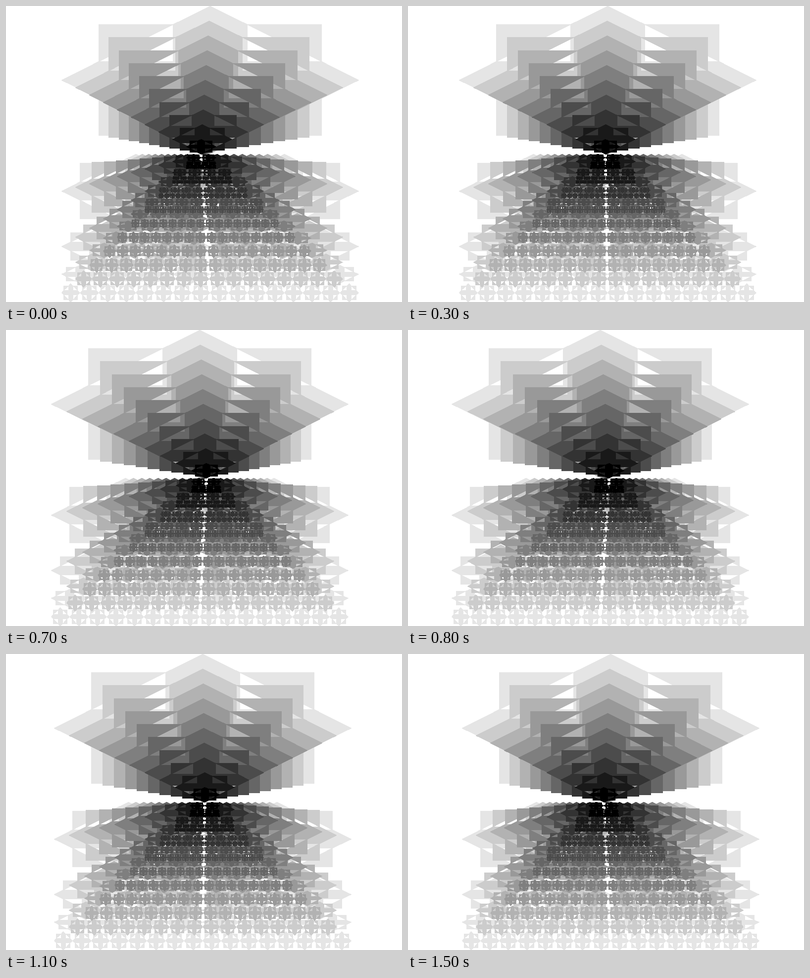
An HTML page for the animation above (1.6 s loop, 800 by 600 pixels).

```html
<!DOCTYPE html>
<html lang="en">
<head>
<meta charset="utf-8">
<title>Star layers</title>
<style>
  html, body { margin: 0; width: 100%; height: 100%; overflow: hidden; background: #fff; }
  svg { display: block; width: 800px; height: 600px; }
</style>
</head>
<body>
<svg viewBox="0 0 800 600" shape-rendering="crispEdges">
  <!-- Half a pixel of offset and a 1px outline make the shapes cover their border pixels. -->
  <g id="stage" transform="translate(.5 .5)" fill-rule="evenodd" stroke-width="1" stroke-linejoin="bevel"></g>
</svg>
<script>
const LAYERS = 10, STEP = 100, STEPS = 16;
const stage = document.getElementById('stage');

// Star on an 8 x 8 grid: the outline, then four triangular holes.
const STAR = [
  [4,0, 5,1, 7,1, 7,3, 8,4, 7,5, 7,7, 5,7, 4,8, 3,7, 1,7, 1,5, 0,4, 1,3, 1,1, 3,1],
  [1,3, 3,1, 3,3],
  [7,3, 5,1, 5,3],
  [1,5, 3,7, 3,5],
  [7,5, 5,7, 5,5]
];

// Corners snap to whole pixels.
function star(x, y, w, h) {
  return STAR.map(pts => {
    let d = '';
    for (let i = 0; i < pts.length; i += 2) {
      const px = Math.floor(x + pts[i] * w / 8);
      const py = Math.floor(y + pts[i + 1] * h / 8);
      d += (i ? 'L' : 'M') + px + ' ' + py;
    }
    return d + 'Z';
  }).join('');
}

// Each row has twice as many stars at half the height; the last row fills the rest.
function layerPath(cx, size) {
  let d = '', y = 300 - size / 2;
  for (let row = 0; row < 5; row++) {
    const n = 2 ** row, w = size / n, h = row < 4 ? w / 2 : w;
    for (let i = 0; i < n; i++) d += star(cx - size / 2 + i * w, y, w, h);
    y += h;
  }
  return d;
}

const layers = Array.from({ length: LAYERS }, (_, i) => {
  const path = document.createElementNS('http://www.w3.org/2000/svg', 'path');
  const grey = Math.floor(255 * (LAYERS - 1 - i) / LAYERS);
  const color = `rgb(${grey},${grey},${grey})`;
  path.setAttribute('fill', color);
  path.setAttribute('stroke', color);
  stage.appendChild(path);
  return path;
});

let shown = -1;
function draw(ms) {
  const step = Math.floor(ms / STEP) % STEPS;
  if (step === shown) return;
  shown = step;
  const sway = 3 * (Math.abs(step - STEPS / 2) - 4);
  layers.forEach((path, i) => {
    path.setAttribute('d', layerPath(400 + sway * (6 - i) / 6, 60 * (LAYERS - i)));
  });
}

let start;
function tick(now) {
  if (start === undefined) start = now;
  draw(Math.max(0, now - start));
  requestAnimationFrame(tick);
}
draw(0);
requestAnimationFrame(tick);
</script>
</body>
</html>
```
